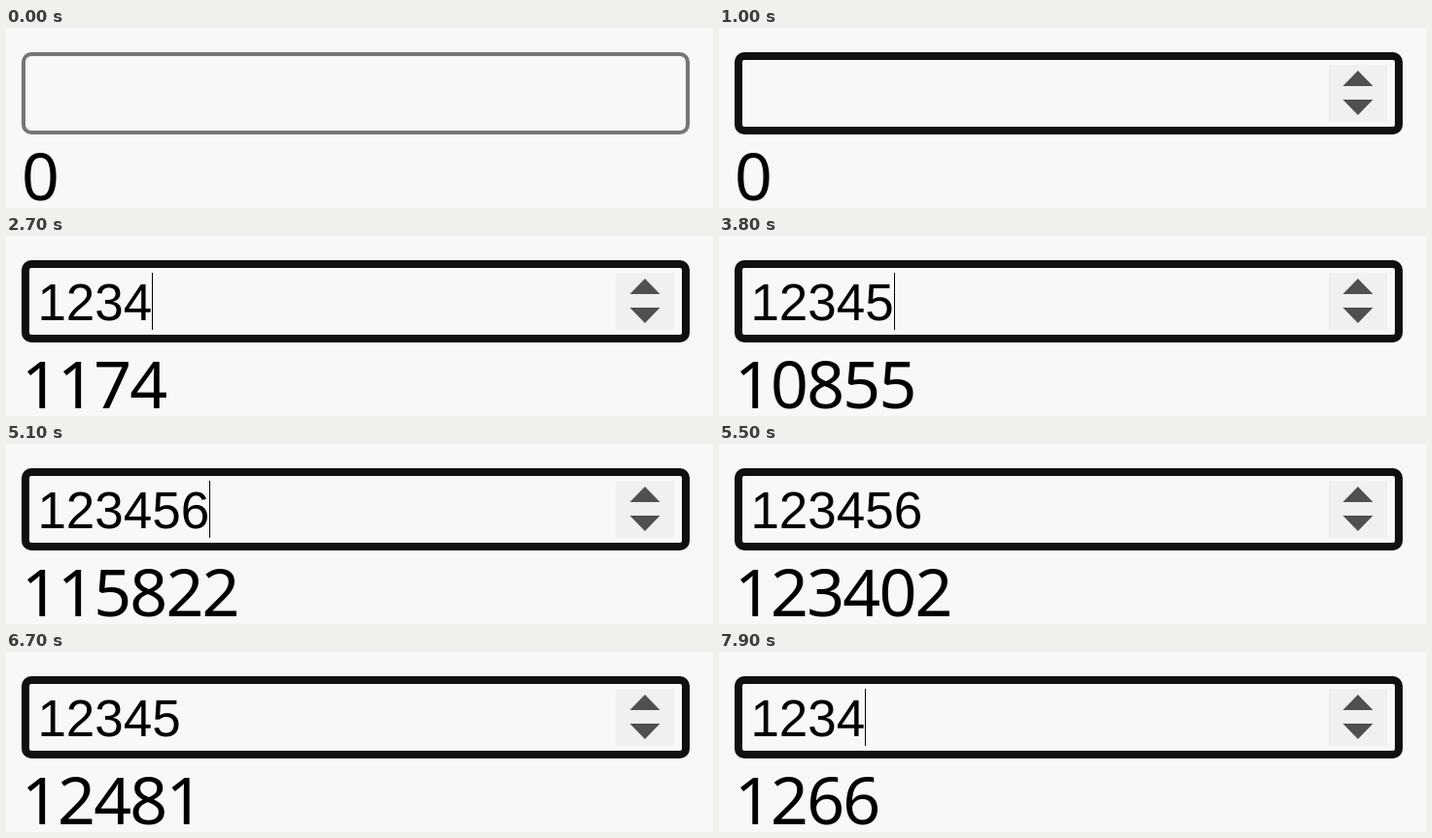
These frames come from a looping animation (727x186 px, 8000 ms). An HTML page:

```html
<!DOCTYPE html>
<html lang="en">
<head>
<meta charset="utf-8">
<title>Animated counter</title>
<style>
  html, body { margin: 0; width: 100%; height: 100%; overflow: hidden; background: #f8f8f8; }
  svg { display: block; width: 727px; height: 186px; }
  #border { fill: none; stroke: #767676; stroke-width: 4; }
  .hover #border { stroke: #4f4f4f; }
  .focus #border { stroke: #101010; stroke-width: 8; }
  #spinner { visibility: hidden; fill: #505050; }
  .hover #spinner, .focus #spinner { visibility: visible; }
  #typed { font: 53px "Liberation Sans", Arial, sans-serif; }
  #count { font: 68px "Noto Sans", "Open Sans", sans-serif; letter-spacing: -1.8px; }
</style>
</head>
<body>
<svg id="stage" viewBox="0 0 727 186">
  <rect id="border"/>
  <g id="spinner">
    <rect x="627" y="38" width="60" height="59" fill="#f0f0f0"/>
    <path d="M657 44L672.5 60H641.5ZM657 90L672.5 74H641.5Z"/>
  </g>
  <text id="typed" x="32.4" y="87"></text>
  <rect id="caret" y="38" width="1" height="59"/>
  <text id="count" x="16" y="178">0</text>
</svg>
<script>
const LOOP = 8000, FRAME = 100, TICK = 18.6, BLINK = 500;
const HOVER = 100, FOCUS = 500;

// [time of the key press, value of the field after it]
const edits = [
  [1150, 1], [1398, 12], [1735, 123], [2450, 1234],
  [3623, 12345], [4866, 123456], [6133, 12345], [7399, 1234]
];

const $ = id => document.getElementById(id);
const stage = $('stage'), border = $('border'), typed = $('typed'), caret = $('caret'), count = $('count');

// Each tick covers a fifth of the remaining distance, rounded up.
function approach(from, to, ticks) {
  let rest = Math.abs(to - from);
  while (ticks-- > 0 && rest) rest -= Math.ceil(rest / 5);
  return to - Math.sign(to - from) * rest;
}

function setBorder(width) {
  const box = { x: 16 + width / 2, y: 25 + width / 2, width: 687 - width, height: 85 - width, rx: 10 - width / 2 };
  for (const key in box) border.setAttribute(key, box[key]);
}

function draw(t) {
  let value = 0, from = 0, blinkStart = FOCUS;
  for (const [time, next] of edits) {
    if (time > t) break;
    from = value;
    value = next;
    if (next > from) blinkStart = Math.ceil(time / FRAME) * FRAME;
  }
  const edit = edits.filter(([time]) => time <= t).pop();
  const text = value ? String(value) : '';
  const focused = t >= FOCUS;

  stage.setAttribute('class', focused ? 'focus' : t >= HOVER ? 'hover' : '');
  setBorder(focused ? 8 : 4);
  typed.textContent = text;
  count.textContent = edit ? approach(from, value, Math.floor((t - edit[0]) / TICK)) : 0;

  const lit = focused && Math.floor((t - blinkStart) / BLINK) % 2 === 0;
  caret.setAttribute('x', Math.floor(32.4 + 29.52 * text.length));
  caret.setAttribute('visibility', lit ? 'visible' : 'hidden');
}

const start = performance.now();
function loop() {
  const t = (performance.now() - start + 5) % LOOP;
  draw(Math.floor(t / FRAME) * FRAME);
  requestAnimationFrame(loop);
}
loop();
</script>
</body>
</html>
```
